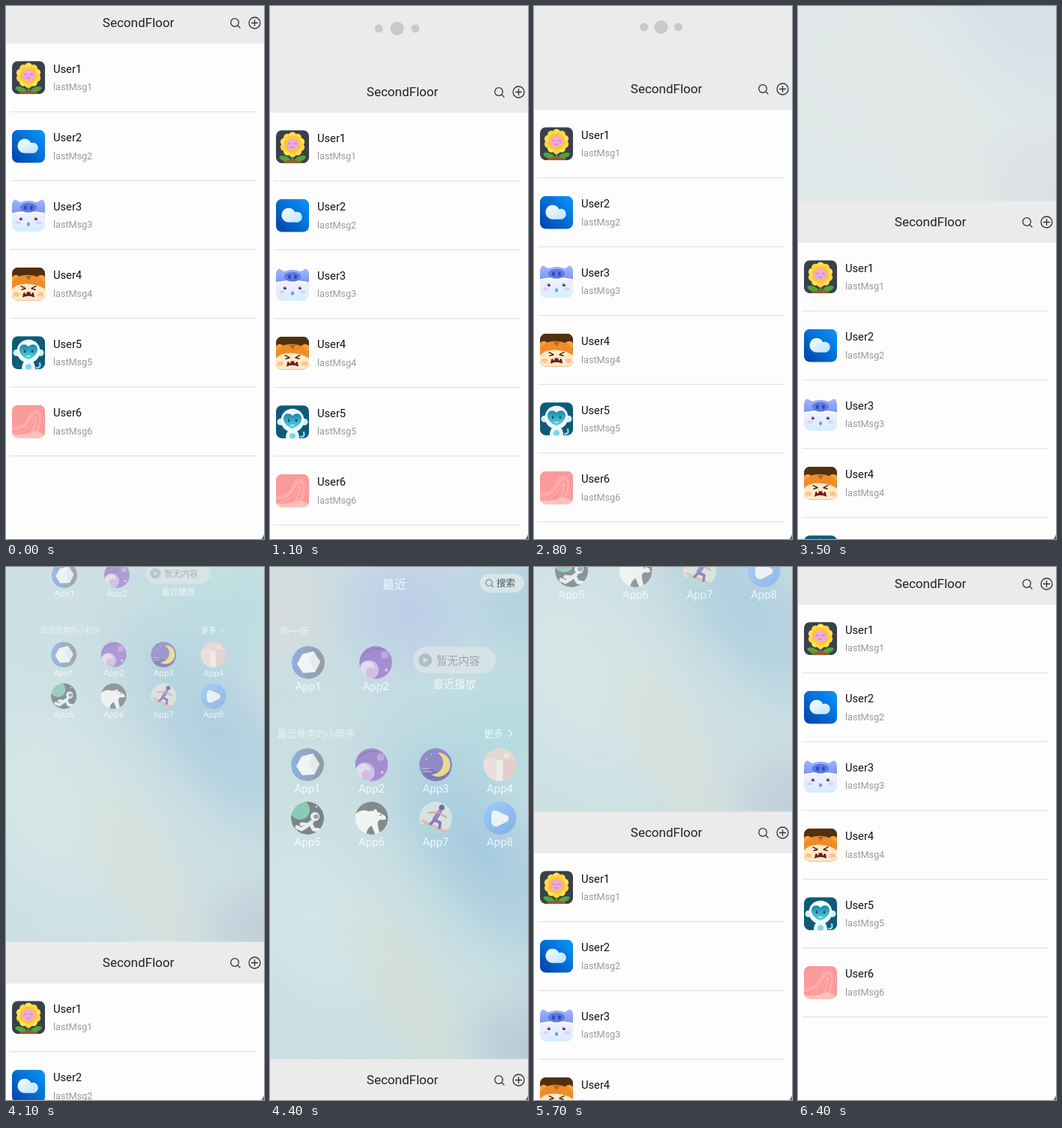
Write an HTML page that moves like this. It is 344 px wide and 709 px high and loops after 7.1 s.

```html
<!DOCTYPE html>
<html lang="zh">
<head>
<meta charset="utf-8">
<style>
  html, body { margin: 0; width: 100%; height: 100%; overflow: hidden; background: #ebebeb; }
  svg { display: block; width: 100vw; height: 100vh; }
  text { font-family: Roboto, "Noto Sans CJK SC", "Noto Sans CJK", sans-serif; }
  .title { font-size: 17px; fill: #222; text-anchor: middle; }
  .user { font-size: 14.7px; fill: #111; }
  .msg { font-size: 12.6px; fill: #999; }
  .light { fill: #fff; fill-opacity: .8; }
  .faint { fill: #fff; fill-opacity: .6; }
  .mid { text-anchor: middle; }
  .line { fill: none; stroke: #333; stroke-width: 1.3; stroke-linecap: round; }
</style>
</head>
<body>
<svg id="stage" viewBox="0 0 344 709" preserveAspectRatio="none"></svg>
<script>
const LOOP = 7100, STEP = 100, OPEN = 660;

// Pull distance in px over time in ms
const PULL = [
  [550, 0], [1100, 92], [1300, 110], [1400, 110], [1500, 72], [1600, 26], [1700, 0],
  [2350, 0], [2800, 88], [3300, 205], [3700, 325], [4000, 450], [4100, 504],
  [4200, 572], [4300, 628], [4400, OPEN], [5100, OPEN], [5200, 633], [5700, 331],
  [6100, 105], [6200, 52], [6300, 16], [6400, 0]
];

const clamp = (v, lo = 0, hi = 1) => Math.min(hi, Math.max(lo, v));
const range = n => [...Array(n).keys()];
const circle = (x, y, r, fill, more = '') => `<circle cx="${x}" cy="${y}" r="${r}" fill="${fill}" ${more}/>`;
const oval = (x, y, rx, ry, fill, more = '') =>
  `<ellipse cx="${x}" cy="${y}" rx="${rx}" ry="${ry}" fill="${fill}" ${more}/>`;
const path = (d, fill, more = '') => `<path d="${d}" fill="${fill}" ${more}/>`;
const stroke = (d, color, w) =>
  path(d, 'none', `stroke="${color}" stroke-width="${w}" stroke-linecap="round" stroke-linejoin="round"`);
const rect = (x, y, w, h, fill, rx = 0) =>
  `<rect x="${x}" y="${y}" width="${w}" height="${h}" rx="${rx}" fill="${fill}"/>`;
const text = (x, y, s, cls, size = '') =>
  `<text x="${x}" y="${y}" class="${cls}" ${size && `style="font-size:${size}px"`}>${s}</text>`;
const ramp = (id, a, b, x2 = 1, y1 = 0, y2 = 1) =>
  `<linearGradient id="${id}" x1="0" y1="${y1}" x2="${x2}" y2="${y2}"><stop stop-color="${a}"/><stop offset="1" stop-color="${b}"/></linearGradient>`;

// Chat avatars, 44 x 44
const petals = range(10).map(i => {
  const a = i * Math.PI / 5;
  return circle(22 + 11.5 * Math.sin(a), 19 - 11.5 * Math.cos(a), 5.2, i % 2 ? '#ffd83a' : '#ffe257');
}).join('');

const avatars = [
  rect(0, 0, 44, 44, '#3a404c') +
    stroke('M22 28V42', '#3f9a3a', 3) +
    oval(12, 38, 8, 3.5, '#4fa63c', 'transform="rotate(20 12 38)"') +
    oval(32, 38, 8, 3.5, '#4fa63c', 'transform="rotate(-20 32 38)"') +
    path('M9 44q2-4 13-4t13 4z', '#a9502c') +
    petals + circle(22, 19, 11.5, '#ffc62e') + oval(22, 19, 8.8, 8, '#eeaad2') +
    stroke('M16.5 18q2-1.5 3.5 0M24 18q2-1.5 3.5 0M20 22.5q2 1.4 4 0', '#b56aa6', .9),

  rect(0, 0, 44, 44, 'url(#sky)') +
    path('M17 31A9.500 9.500 0 1 1 25.500 17.500A7 7 0 1 1 29 31z', 'url(#cloud)'),

  rect(0, 0, 44, 44, '#fff') +
    path('M0 20H44V36Q43 44 34 44H10Q1 44 0 36z', 'url(#snow)') +
    path('M0 19V4Q1-1 6 2L11 5Q22 0 33 5L38 2Q43-1 44 4V19Q22 14 0 19z', 'url(#hat)') +
    oval(22, 12, 11, 6.5, '#5d7ae4') + oval(18, 12, 1.8, 3, '#2f48aa') + oval(26, 12, 1.8, 3, '#2f48aa') +
    circle(12, 27, 2, '#34386a') + circle(32, 27, 2, '#34386a') +
    circle(12.7, 26.2, .7, '#fff') + circle(32.7, 26.2, .7, '#fff') +
    oval(8, 32, 3.5, 2, '#e9c8f2') + oval(36, 32, 3.5, 2, '#e9c8f2') + oval(22, 34, 2, 2.7, '#7897e2'),

  rect(0, 0, 44, 44, '#52300d') +
    circle(5, 16, 6, '#f4a13c') + circle(39, 16, 6, '#f4a13c') +
    path('M-1 44V23Q4 9 22 10T45 23V44z', '#ee8c2a') +
    path('M0 44V29Q8 21 22 22T44 29V44z', '#ffe9c8') +
    path('M18 11L22 17L26 11z', '#b9601a') +
    stroke('M12 25L18 28L13 29.500M32 25L26 28L31 29.500', '#4b2112', 1.5) +
    path('M15 34Q22 31 29 34L30 40Q22 36 14 40z', '#6e1d1a') +
    path('M17 33.300l1.500 3 1.500-3.500zM24 32.700l1.500 3.600 1.500-3z', '#fff') +
    oval(6, 36, 4, 3, '#ffc28c') + oval(38, 36, 4, 3, '#ffc28c'),

  rect(0, 0, 44, 44, '#0e5b78') +
    circle(6, 22, 4.5, '#d5edf5') + circle(38, 22, 4.5, '#d5edf5') +
    stroke('M33 42Q39 42 37 36', '#7fd4e6', 2.5) +
    path('M13 44Q13 32 22 32T31 44z', '#eaf7fb') + circle(22, 20, 15.5, '#f1fafd') +
    path('M22 31C6 25 8 11 16 11Q20 11 22 14Q24 11 28 11C36 11 38 25 22 31z', 'url(#heart)') +
    oval(17, 20, 1.3, 2, '#0b5570') + oval(27, 20, 1.3, 2, '#0b5570') +
    stroke('M20 26q2 1.500 4 0', '#d9f7ff', 1.2) + oval(22, 41, 4, 4, '#7fd4e6'),

  rect(0, 0, 44, 44, '#fb9a9b') +
    stroke('M-2 34Q18 33 24 20Q30 6 34 13Q37 23 28 39', '#ffaaa9', 9) +
    stroke('M-2 36Q20 35 26 20Q31 10 34 15Q36 23 29 37', '#f7898f', 1.2) +
    path('M0 44V39Q20 40 26 36T44 41V44z', '#ffc0bc')
];

// Round app icons, radius 22 around the origin
const apps = [
  circle(0, 0, 22, 'url(#slate)') + path('M-22 4L-6 22H-22z', '#7a98d8') +
    path('M-8-11L7-15L16-1L9 13L-7 14L-15 2z', '#fafafa') + path('M7-15L16-1L9 13L2-2z', '#eceef0'),

  circle(0, 0, 22, 'url(#violet)') + circle(-9, 10, 13, '#cdbdec') + circle(-11, 8, 9.5, '#efdcf2') +
    circle(-7, 13, 6.5, '#dab4de') + circle(12, -10, 5, '#c19ae0') +
    stroke('M-17-10Q-5-20 8-18', '#8a68bc', 2) + circle(14, 10, 2, '#d8c2f0'),

  circle(0, 0, 22, '#8676bd') + path('M-22 22Q-14 0 0 8T22 6V22z', '#7161ab') +
    path('M2-16A16 16 0 1 1-6 13A15.500 15.500 0 0 0 2-16z', '#fbdc78') +
    circle(-12, -8, 1, '#e9def8') + circle(-6, -14, .8, '#e9def8') + stroke('M-18 5H-8M-15 9H-6', '#a99ad6', 2),

  circle(0, 0, 22, '#f3d6cf') + path('M-22-6Q-8-14 0-4V22H-22z', '#f8e2da') +
    path('M0-4Q10-14 22-6V22H0z', '#f3cbc2') + rect(-5, -6, 9, 28, '#faf1ee') + circle(9, -12, 3.500, '#f9ebe5'),

  circle(0, 0, 22, '#626c74') + circle(-10, -11, 13, '#7cc5aa') +
    circle(10, -2, 6, '#f2f3f5') + oval(11.5, -2, 3.500, 3, '#8d97a2') +
    stroke('M6 5L0 9L-8 8M5 9L8 15L15 16M0 10L-8 15L-14 12', '#eef0f2', 5) +
    circle(12, -15, 1, '#fff') + circle(-15, 16, 1, '#fff'),

  circle(0, 0, 22, '#747474') +
    path('M-22-5Q-14-13-4-9Q4-11 11-7L21-1Q20 3 12 2Q8 3 8 8L11 22H5L0 10Q-7 14-7 22H-22z', '#fafaf8') +
    circle(5, -9.5, 2.200, '#fafaf8') + circle(12, -4, .9, '#444') + circle(20, -1, 1.300, '#444'),

  circle(0, 0, 22, '#e3e7df') + path('M-22 10Q-8 2 4 12T22 8V22H-22z', '#a9dbd6') +
    stroke('M-17 4L15 19', '#f2b3a8', 4) + circle(8, -14, 3.8, '#65528f') +
    stroke('M5-8L-1 1', '#9470bd', 6) + stroke('M4-8L-9-7M6-6L14-1', '#dba598', 2.400) +
    stroke('M-1 3L6 6L5 13M-2 3L-7 8', '#7560ab', 3.600),

  circle(0, 0, 22, 'url(#azure)') +
    path('M-6-7L8-1Q10 0 8 2L-4 8Q-8 9-8.500 5V-4Q-8.500-8-6-7z', '#fbfdff',
      'stroke="#fbfdff" stroke-width="6" stroke-linejoin="round"')
];

// Soft colour patches of the upper page: x, y, rx, ry, tilt, colour
const patches = [
  [15, 55, 130, 130, 0, '#d6dcdc'], [185, 60, 150, 140, 0, '#bccfe8'], [344, 40, 130, 140, 0, '#b2d2e0'],
  [310, 215, 170, 130, 0, '#b4dbdf'], [60, 470, 220, 150, 55, '#d3e6e6'], [280, 375, 280, 125, 52, '#a6cbdf'],
  [185, 570, 220, 80, 62, '#d4dfd8'], [344, 640, 120, 110, 0, '#bacbd7']
];
const blob = ([x, y, rx, ry, tilt, c], i) =>
  `<radialGradient id="b${i}"><stop stop-color="${c}"/><stop offset=".35" stop-color="${c}" stop-opacity=".72"/>` +
  `<stop offset=".7" stop-color="${c}" stop-opacity=".2"/><stop offset="1" stop-color="${c}" stop-opacity="0"/></radialGradient>` +
  oval(x, y, rx, ry, `url(#b${i})`, `transform="rotate(${tilt} ${x} ${y})"`);

const app = (i, x, y) =>
  `<g transform="translate(${x} ${y})"><g clip-path="url(#round)" opacity=".78">${apps[i]}</g>` +
  text(0, 36.500, 'App' + (i + 1), 'light mid', 15) + '</g>';

const lens = (x, y, k) =>
  `<g transform="translate(${x} ${y}) scale(${k})"><path class="line" d="M5.300 0A5.300 5.300 0 1 1-5.300 0A5.300 5.300 0 1 1 5.300 0M3.900 3.900L7 7"/></g>`;

const floor =
  text(166, 29, '最近', 'light mid', 16) +
  `<g opacity=".6">${rect(280, 9, 59, 25, '#eef0ee', 12.500)}${lens(292, 21, .8)}${text(302, 26, '搜索', '', 12.500)}</g>` +
  text(14, 90, '听一听', 'faint', 12.800) + app(0, 51, 127) + app(1, 141, 127) +
  `<g opacity=".65">${rect(191, 106, 110, 36, '#e2e7e6', 18)}${circle(207, 124, 9, '#a6b0b3')}` +
  path('M204.500 120L211 124L204.500 128z', '#e2e7e6') + '</g>' +
  `<g fill="#9ba7a9">${text(222, 129.500, '暂无内容', '', 14.500)}</g>` +
  text(246, 161, '最近播放', 'light mid', 14.400) +
  text(10, 226, '最近使用的小程序', 'faint', 12.900) + text(285, 226, '更多', 'light', 13) +
  stroke('M318.500 217L323 221.500L318.500 226', '#f2f6f6', 1.2) +
  range(8).map(i => app(i, 50 + (i % 4) * 85.500, i < 4 ? 263 : 334)).join('');

const row = i =>
  `<g transform="translate(0 ${i * 91.500})">` +
  `<g transform="translate(8 73.200)" clip-path="url(#tile)">${avatars[i]}</g>` +
  text(63, 88.500, 'User' + (i + 1), 'user') + text(63, 112, 'lastMsg' + (i + 1), 'msg') +
  rect(5, 140.300, 329, 1, '#dcdcde') + '</g>';

const stage = document.getElementById('stage');
stage.innerHTML =
  '<defs><clipPath id="round"><circle r="22"/></clipPath>' +
  '<clipPath id="tile"><rect width="44" height="44" rx="8"/></clipPath>' +
  ramp('sky', '#0340a6', '#0698ff', 1, 1, 0) + ramp('cloud', '#fff', '#b5e2ff') +
  ramp('snow', '#f1efff', '#d3edff', 0) + ramp('hat', '#a3b4fb', '#7d97f2', 0) + ramp('heart', '#1b86a8', '#5fd6e2', 0) +
  ramp('slate', '#7ea4e6', '#85898f', 1, 0, 0) + ramp('violet', '#8f76c6', '#a57bcb') + ramp('azure', '#9ccbf6', '#74a6ec') +
  '</defs>' +
  rect(0, 0, 344, 709, '#ebebeb') +
  '<g id="dots">' + circle(0, 0, 5.500, '#c9c9c9').repeat(2) + circle(0, 0, 9, '#c9c9c9') + '</g>' +
  `<g id="panel">${rect(0, 0, 344, 656, '#c9dfe2')}${patches.map(blob).join('')}<g id="floor">${floor}</g></g>` +
  '<g id="home">' + rect(0, 49, 344, 720, '#fdfdfd') + rect(0, -5.500, 344, 55.500, '#ebebeb') +
  text(176.500, 28, 'SecondFloor', 'title') + lens(305, 22, 1) +
  '<path class="line" d="M339 22.500A7.500 7.500 0 1 1 324 22.500A7.500 7.500 0 1 1 339 22.500M327.500 22.500H335.500M331.500 18.500V26.500"/>' +
  range(6).map(row).join('') + '</g>' +
  path('M344 703V709H340.500Q343 707 344 703z', '#555');

const [dots, panel, floorBox, home] = ['dots', 'panel', 'floor', 'home'].map(id => document.getElementById(id));
const [left, right, centre] = dots.children;

function pullAt(t) {
  const i = PULL.findIndex(k => k[0] >= t);
  if (i < 1) return 0;
  const [t0, a] = PULL[i - 1], [t1, b] = PULL[i];
  return a + (b - a) * (t - t0) / (t1 - t0);
}

function draw(t) {
  // Whole pixels keep the text crisp while it moves
  const off = Math.round(pullAt(t)), closing = t > 5000;
  home.setAttribute('transform', `translate(0 ${off})`);

  const spread = clamp((off - 27) * .375, 0, 32);
  dots.setAttribute('transform', `translate(169.500 ${off / 2 - 16})`);
  dots.setAttribute('opacity', closing ? 0 : clamp((off - 20) / 30) * clamp((190 - off) / 60));
  left.setAttribute('cx', -spread);
  right.setAttribute('cx', spread);
  centre.setAttribute('r', clamp(off / 8, 0, 9));

  const scale = closing ? 1 : clamp(off / 648);
  panel.setAttribute('transform', `translate(0 ${off - OPEN})`);
  panel.setAttribute('opacity', closing ? .7 + .3 * off / OPEN : clamp((off - 120) / 450));
  floorBox.setAttribute('transform', `translate(172 306) scale(${scale}) translate(-172 -306)`);
}

// The picture advances ten times a second
const start = performance.now();
function tick() {
  const t = (performance.now() - start) % LOOP;
  draw(Math.floor(t / STEP) * STEP);
  requestAnimationFrame(tick);
}
tick();
</script>
</body>
</html>
```
